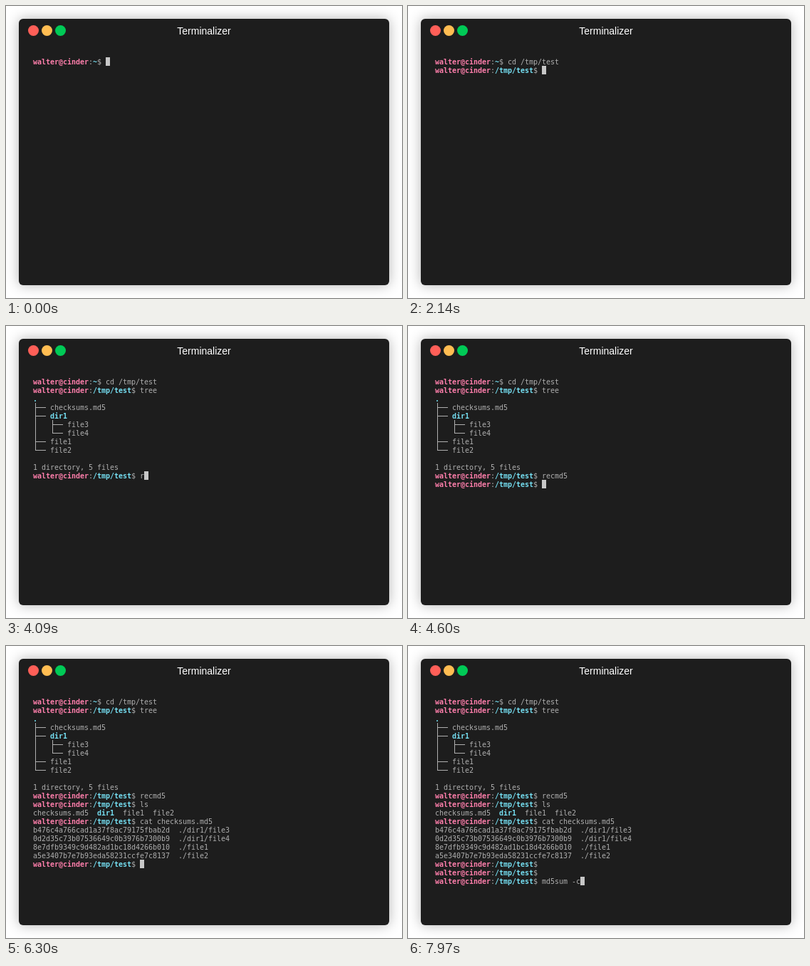
Animation of 556 by 410 pixels, one loop 8 s. Source, as an HTML page with a canvas:

```html
<!DOCTYPE html>
<html lang="en">
<head>
<meta charset="utf-8">
<title>Terminalizer</title>
<style>
html, body { margin: 0; width: 100%; height: 100%; overflow: hidden; background: #fff; }
.window {
  position: absolute; left: 18px; top: 18px; width: 520px; height: 374px;
  border-radius: 6px; background: #1d1d1d; box-shadow: 0 0 18px rgba(0, 0, 0, .3);
}
.title {
  position: absolute; left: 0; right: 0; top: 9px; text-align: center; color: #fff;
  font: 14px/16px "Liberation Sans", Arial, sans-serif;
}
.dot { position: absolute; top: 9px; width: 15px; height: 15px; border-radius: 50%; }
canvas { position: absolute; left: 0; top: 0; }
</style>
</head>
<body>
<div class="window">
  <div class="dot" style="left:13px;background:#ff5f58"></div>
  <div class="dot" style="left:32px;background:#ffbd52"></div>
  <div class="dot" style="left:51px;background:#00ca56"></div>
  <div class="title">Terminalizer</div>
</div>
<canvas id="screen" width="556" height="410"></canvas>
<script>
const ctx = document.getElementById("screen").getContext("2d");
const LOOP = 8000, LEFT = 38, TOP = 72, CELL_W = 6, CELL_H = 12;
const FAMILY = '"DejaVu Sans Mono", "Noto Sans Mono", monospace';

// Inline style marks: ^ user, * path, % plain
const STYLES = {
  "^": { color: "#ff7fac", font: "bold 10px " + FAMILY },
  "*": { color: "#75dff2", font: "bold 10px " + FAMILY },
  "%": { color: "#afafaf", font: "10px " + FAMILY }
};
const prompt = dir => `^walter@cinder%:*${dir}%$ `;
const PROMPT = prompt("/tmp/test");

const events = [];
const print = (time, text) => events.push({ time, text });
const type = (from, to, text) => [...text].forEach((ch, i) =>
  print(from + (to - from) * i / (text.length - 1), ch));

print(0, prompt("~"));
type(400, 1110, "cd /tmp/te");
print(1210, "st");
print(2140, "\n" + PROMPT);
print(2830, "t");
type(3000, 3280, "ree\n");
print(3380, `*.%
├── checksums.md5
├── *dir1%
│   ├── file3
│   └── file4
├── file1
└── file2

1 directory, 5 files
`);
print(3480, PROMPT);
type(4090, 4510, "recmd5\n");
print(4580, PROMPT);
type(4650, 4800, "ls\n");
print(4900, "checksums.md5  *dir1%  file1  file2\n");
print(5000, PROMPT);
type(5440, 5760, "cat ch");
print(5830, "ecksums.md5 ");
print(6300, `
b476c4a766cad1a37f8ac79175fbab2d  ./dir1/file3
0d2d35c73b07536649c0b3976b7300b9  ./dir1/file4
8e7dfb9349c9d482ad1bc18d4266b010  ./file1
a5e3407b7e7b93eda58231ccfe7c8137  ./file2
` + PROMPT);
print(6680, "\n");
print(6780, PROMPT);
print(6920, "\n" + PROMPT);
type(7360, 7970, "md5sum -c");

function drawBranch(ch, x, y) {
  if (ch !== "─") ctx.fillRect(x + 3, y, 1, ch === "└" ? 7 : CELL_H);
  if (ch === "─") ctx.fillRect(x, y + 6, CELL_W, 1);
  else if (ch !== "│") ctx.fillRect(x + 4, y + 6, 2, 1);
}

function setStyle(mark) {
  ctx.fillStyle = STYLES[mark].color;
  ctx.font = STYLES[mark].font;
}

function draw(time) {
  ctx.clearRect(0, 0, 556, 410);
  setStyle("%");
  let x = LEFT, y = TOP;
  for (const event of events) {
    if (event.time > time + 0.5) break;
    for (const ch of event.text) {
      if (STYLES[ch]) setStyle(ch);
      else if (ch === "\n") { x = LEFT; y += CELL_H; }
      else {
        if ("├└│─".includes(ch)) drawBranch(ch, x, y);
        else ctx.fillText(ch, x, y + 10);
        x += CELL_W;
      }
    }
  }
  ctx.fillStyle = "#c7c7c7";
  ctx.fillRect(x, y, CELL_W, CELL_H);
}

const start = performance.now();
function tick() {
  draw((performance.now() - start) % LOOP);
  requestAnimationFrame(tick);
}
tick();
</script>
</body>
</html>
```
